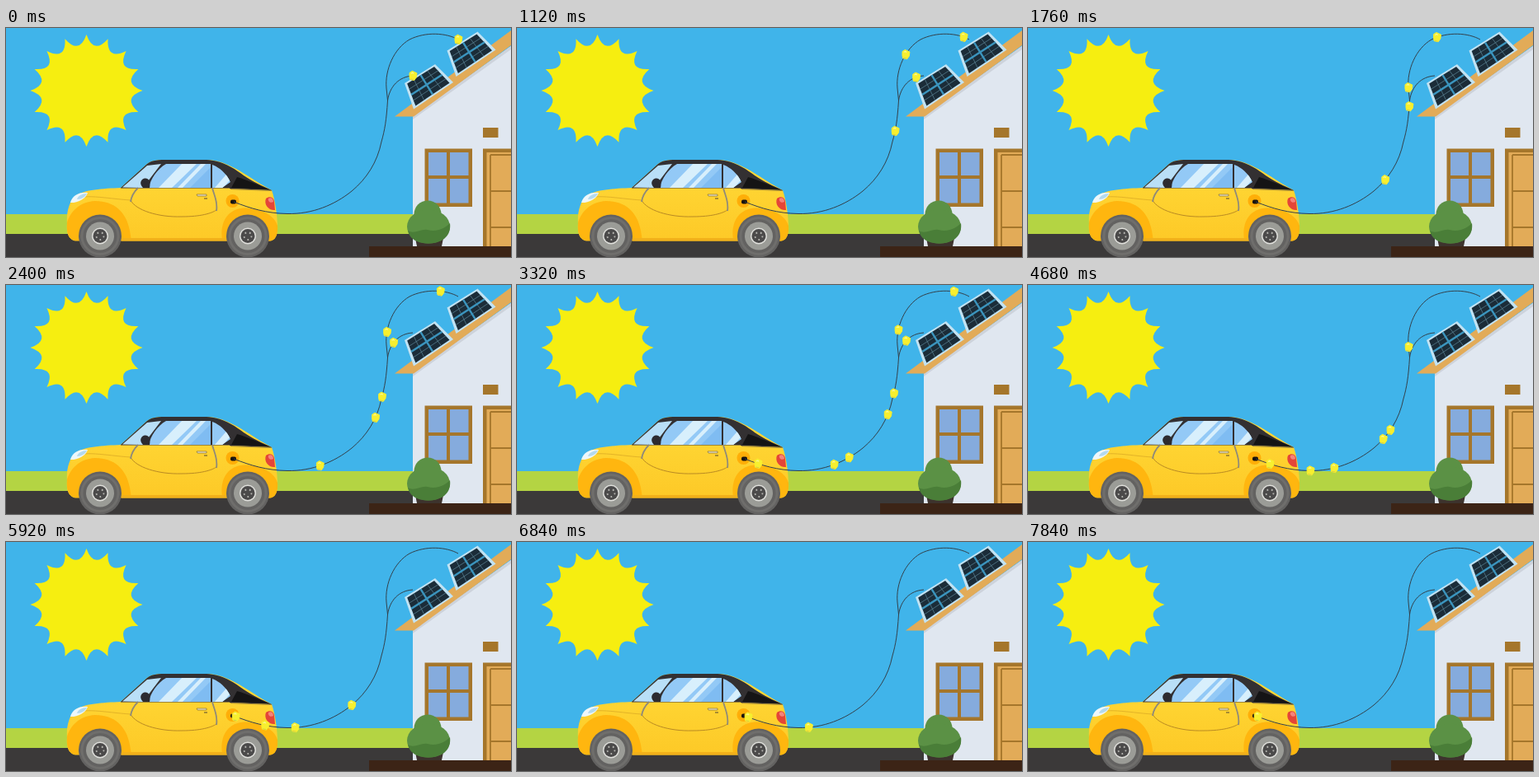
An HTML page for the animation above (7880 ms loop, 612 px wide and 278 px high).

```html
<!DOCTYPE html>
<html lang="en">
<head>
<meta charset="utf-8">
<title>Solar charging</title>
<style>
html, body { margin: 0; width: 100%; height: 100%; overflow: hidden; background: #40b4ea; }
svg { display: block; width: 612px; height: 278px; }
</style>
</head>
<body>
<svg viewBox="0 0 612 278" xmlns="http://www.w3.org/2000/svg">
<defs>
  <linearGradient id="paint" x1="0" y1="0" x2="0" y2="1">
    <stop offset="0" stop-color="#ffda38"/>
    <stop offset="1" stop-color="#fdc927"/>
  </linearGradient>
  <clipPath id="glass">
    <path d="M173 194 C175 184 183 171 194 165 H248 V194 Z M250 166 C259 169 268 178 272 187 L262 194 H250 Z"/>
  </clipPath>
  <g id="wheel">
    <circle r="26" fill="#636261"/>
    <circle r="22" fill="none" stroke="#6f6e6c" stroke-width="3"/>
    <circle r="17" fill="#9b9c97"/>
    <circle r="10" fill="#e0e0dc"/>
    <circle r="8.500" fill="#4b4a4a"/>
    <circle r="4.500" fill="none" stroke="#b5b5b0" stroke-width="1.800" stroke-dasharray="1.8 3.855"/>
  </g>
  <g id="panel">
    <path id="frame" fill="#c2e3f3"/>
    <path id="cells" fill="#1b2c38"/>
    <path id="thin" fill="none" stroke="#5d8799" stroke-width=".7"/>
    <path id="thick" fill="none" stroke="#3b94bd" stroke-width="2.400"/>
  </g>
  <g id="bulb" transform="rotate(12) scale(.92)">
    <path d="M-5 -3 L-2 -6 L4.500 -4.500 L5 1 L3 5.500 H-2.500 L-4 2 Z" fill="#f7ef2f" stroke="#f7ef2f" stroke-linejoin="round"/>
    <path d="M-3 -2.500 L-1 -4 L.5 -3" fill="none" stroke="#fbf8a0" stroke-width="1.200"/>
    <path d="M-2 5 H2.500" stroke="#d9d044" stroke-width="1.200"/>
  </g>
</defs>

<rect width="612" height="278" fill="#40b4ea"/>
<rect y="226" width="612" height="25" fill="#b4d443"/>
<rect y="250" width="612" height="28" fill="#3b3939"/>
<path id="sun" fill="#f6ee10"/>

<!-- house -->
<path d="M493 107 L612 22 V266 H493 Z" fill="#e0e7f0"/>
<path d="M493 107 L612 22 V26 L493 111 Z" fill="#cdd3dc"/>
<path d="M471 107.500 L612 3 V21 L494 107.500 Z" fill="#e2ab58"/>
<rect x="578" y="121" width="18.500" height="12" fill="#a5762b"/>
<rect x="507.500" y="146.500" width="57.500" height="70.500" fill="#a5762b"/>
<path d="M512 151h22v28h-22z M538 151h22.500v28H538z M512 183h22v29.500h-22z M538 183h22.500v29.500H538z" fill="#85abdd"/>
<rect x="578" y="146.500" width="34" height="119" fill="#a5762b"/>
<rect x="582.500" y="151" width="29.500" height="114" fill="#e2ab58"/>
<path d="M587 154V265 M587 154H612 M587 198H612 M587 242H612" stroke="#a5762b" stroke-width="1.800" fill="none"/>
<rect x="440" y="265" width="172" height="13" fill="#3c2416"/>
<path d="M496 255H530L528 265H498Z" fill="#3d332d"/>
<g fill="#5b9145">
  <circle cx="511" cy="226" r="16.500"/>
  <ellipse cx="512" cy="241" rx="26" ry="20.500"/>
</g>
<path d="M487 246 C495 251 503 243 511 245 C521 248 531 244 538 237 C540 252 529 261.500 512 261.500 C498 261.500 489 256 487 246Z" fill="#4a7e38"/>
<use href="#panel"/>
<use href="#panel" x="51.500" y="-39.500"/>

<!-- car -->
<path d="M84 258.500 C76 257 73 249 74 238 C73 224 76 212 84 204 C94 196 118 195 139 194 L171 165 C178 160 184 160 198 160 H243 C272 161 292 181 322 197 C326 208 329 228 329 242 C329 252 326 258.500 319 258.500 Z" fill="url(#paint)"/>
<path d="M74 236 C78 224 88 211 108 210 C132 210 146 224 150 246 L152 258 H84 C76 257 73 249 74 236Z M262 258 C258 229 275 216 296 219 C313 221 326 229 329 240 C330 252 326 258.500 319 258.500Z" fill="#ffb60f"/>
<path d="M140 255 H270 V258.500 H140Z" fill="#f2b11a"/>
<path d="M139 194 L171 165 C178 160 184 160 198 160 H243 C262 161 276 170 288 179 C298 186 311 192 322 197 L272 195 L139 194Z" fill="#333032"/>
<path d="M141 193.500 L171 167 L188 165 L166 194Z" fill="#b9dff7"/>
<g clip-path="url(#glass)">
  <rect x="150" y="160" width="125" height="36" fill="#93c9f6"/>
  <path d="M184 195 L214 164 H232 L200 195Z M207 195 L237 164 H243 L213 195Z M252 195 L272 172 V184 L262 195Z" fill="#d8effc"/>
  <path d="M222 195 L250 167 V195Z" fill="#7fbcf2"/>
</g>
<path d="M273 194 L280 181 C292 184 306 191 319 196Z" fill="#151415"/>
<path d="M165 184 C171 180 176 185 174 194 H166 C163 191 162 187 165 184Z" fill="#2c2b30"/>
<g fill="none" stroke="#b98a23">
  <path d="M151 209 C157 221 184 230 213 229 C236 229 249 225 255 221"/>
  <path d="M80 210 C92 200 120 207 151 209" stroke="#e3b327"/>
  <path d="M139 194.500 H271 M272 195.500 L322 197.500" stroke="#9e8435"/>
</g>
<path d="M160 194 C155 199 152 204 151 211 M250 194 C252 203 257 210 255 222" fill="none" stroke="#8f8a79" stroke-width="1.800"/>
<path d="M231 202 H243 V204 H232Z" fill="#f2efe3" stroke="#8b7430" stroke-width=".8"/>
<path d="M240 207 H244" stroke="#8b7430" stroke-width="1.500"/>
<path d="M78 212 C80 204 88 199 99 200 C97 206 91 210 82 212Z" fill="#edf7fb"/>
<path d="M86 208 C87 204 92 201 98 201 C96 205 92 208 86 208Z" fill="#b3d9ee"/>
<path d="M315 207 C319 204 324 205 325 210 L326 221 C319 222 312 215 315 207Z" fill="#e44538"/>
<path d="M318 207 C321 205 324 207 324 211 C321 213 317 211 318 207Z" fill="#f5837a"/>
<use href="#wheel" x="114" y="252.500"/>
<use href="#wheel" x="293" y="252.500"/>
<circle cx="274.500" cy="210" r="8" fill="#ffae08"/>
<rect x="272" y="208.500" width="7" height="5" rx="2" fill="#17130f"/>

<path id="cable" fill="none" stroke="#33404a"/>
<g fill="none">
  <path id="upper"/>
  <path id="lower"/>
</g>
<g id="bulbs"></g>
</svg>

<script>
const LOOP = 7880, STAGGER = 960, COUNT = 4;
const $ = id => document.getElementById(id);
const draw = (id, d) => $(id).setAttribute('d', d);

// sun: 16 tips joined by hollow curves
const ray = (step, r) => {
  const a = step * Math.PI / 16;
  return `${97.5 + r * Math.sin(a)} ${76 - r * Math.cos(a)}`;
};
let sunPath = 'M' + ray(0, 68);
for (let i = 1; i < 32; i += 2) sunPath += `Q${ray(i, 44)} ${ray(i + 1, 68)}`;
draw('sun', sunPath + 'Z');

// solar panel: a grid on a tilted quad
const corners = [[483, 67], [520, 44], [542, 66], [494, 98.5]];
const onPanel = (u, v) => [0, 1].map(k => {
  const [a, b, c, d] = corners.map(p => p[k]);
  return (a * (1 - u) + b * u) * (1 - v) + (d * (1 - u) + c * u) * v;
}).join(' ');
const quad = m => `M${onPanel(m, m)}L${onPanel(1 - m, m)}L${onPanel(1 - m, 1 - m)}L${onPanel(m, 1 - m)}Z`;
const line = (u1, v1, u2, v2) => `M${onPanel(u1, v1)}L${onPanel(u2, v2)}`;
const bars = list => list.map(p => line(p, .06, p, .94) + line(.06, p, .94, p)).join('');
draw('frame', quad(0));
draw('cells', quad(.065));
draw('thin', bars([.28, .72]));
draw('thick', bars([.5]));

// cables share the stretch from the junction to the car
const upper = 'M548 14 C534 6 509 4 489 14 C470 25 459 51 461 73 L462.5 88';
const lower = 'M493 58 C476 59 465 71 462.5 88';
const shared = 'C461 112 459 124 455 138 C450 163 437 183 419 198 C398 215 371 226 341 225.5 C316 225 296 219 276 211';
draw('upper', upper + shared);
draw('lower', lower + shared);
draw('cable', lower + upper + shared);

// [time, x, y] along each cable
const routes = {
  upper: [[0, 548, 14], [160, 541, 11], [460, 528, 8], [1120, 472, 33], [1420, 462, 56],
    [1800, 462, 75], [2380, 454, 133], [2760, 439, 176], [3040, 419, 198], [3320, 403, 210],
    [3720, 371, 222], [4000, 350, 225], [4680, 293, 218], [5000, 276, 211]],
  lower: [[0, 493, 58], [160, 484, 61], [460, 470, 68], [1120, 457, 125], [1420, 448, 159],
    [1800, 430, 187], [2380, 382, 217], [2760, 342, 225], [3040, 314, 222], [3320, 292, 217],
    [3520, 276, 211]]
};

function nearest(path, x, y) {
  const total = path.getTotalLength();
  let best = 0, min = Infinity;
  for (let s = 0; s <= total; s += .5) {
    const p = path.getPointAtLength(s), d = Math.hypot(p.x - x, p.y - y);
    if (d < min) { min = d; best = s; }
  }
  return best;
}

function makeTrack(id) {
  const path = $(id);
  const keys = routes[id].map(([t, x, y]) => [t, nearest(path, x, y)]);
  const last = keys.length - 1;
  const slope = i => {
    const a = keys[Math.max(0, i - 1)], b = keys[Math.min(last, i + 1)];
    return (b[1] - a[1]) / (b[0] - a[0]);
  };
  const distance = t => {
    let i = 0;
    while (i < last - 1 && t >= keys[i + 1][0]) i++;
    const [t0, s0] = keys[i], [t1, s1] = keys[i + 1];
    const h = t1 - t0, u = (t - t0) / h, v = 1 - u;
    return s0 * (1 + 2 * u) * v * v + s1 * u * u * (3 - 2 * u)
      + h * u * v * (slope(i) * v - slope(i + 1) * u);
  };
  return { end: keys[last][0], at: t => path.getPointAtLength(distance(t)) };
}

const bulbs = [];
for (const id of ['upper', 'lower']) {
  const track = makeTrack(id);
  for (let i = 0; i < COUNT; i++) {
    const el = document.createElementNS('http://www.w3.org/2000/svg', 'use');
    el.setAttribute('href', '#bulb');
    $('bulbs').append(el);
    bulbs.push({ el, track, start: i * STAGGER });
  }
}

function render(time) {
  for (const { el, track, start } of bulbs) {
    const t = time - start, shown = t >= 0 && t < track.end;
    el.style.display = shown ? '' : 'none';
    if (!shown) continue;
    const p = track.at(t);
    el.setAttribute('transform', `translate(${p.x} ${p.y})`);
  }
}

const begin = performance.now();
function tick() {
  const time = (performance.now() - begin) % LOOP;
  render(Math.floor(time / 40) * 40);
  requestAnimationFrame(tick);
}
render(0);
requestAnimationFrame(tick);
</script>
</body>
</html>
```
